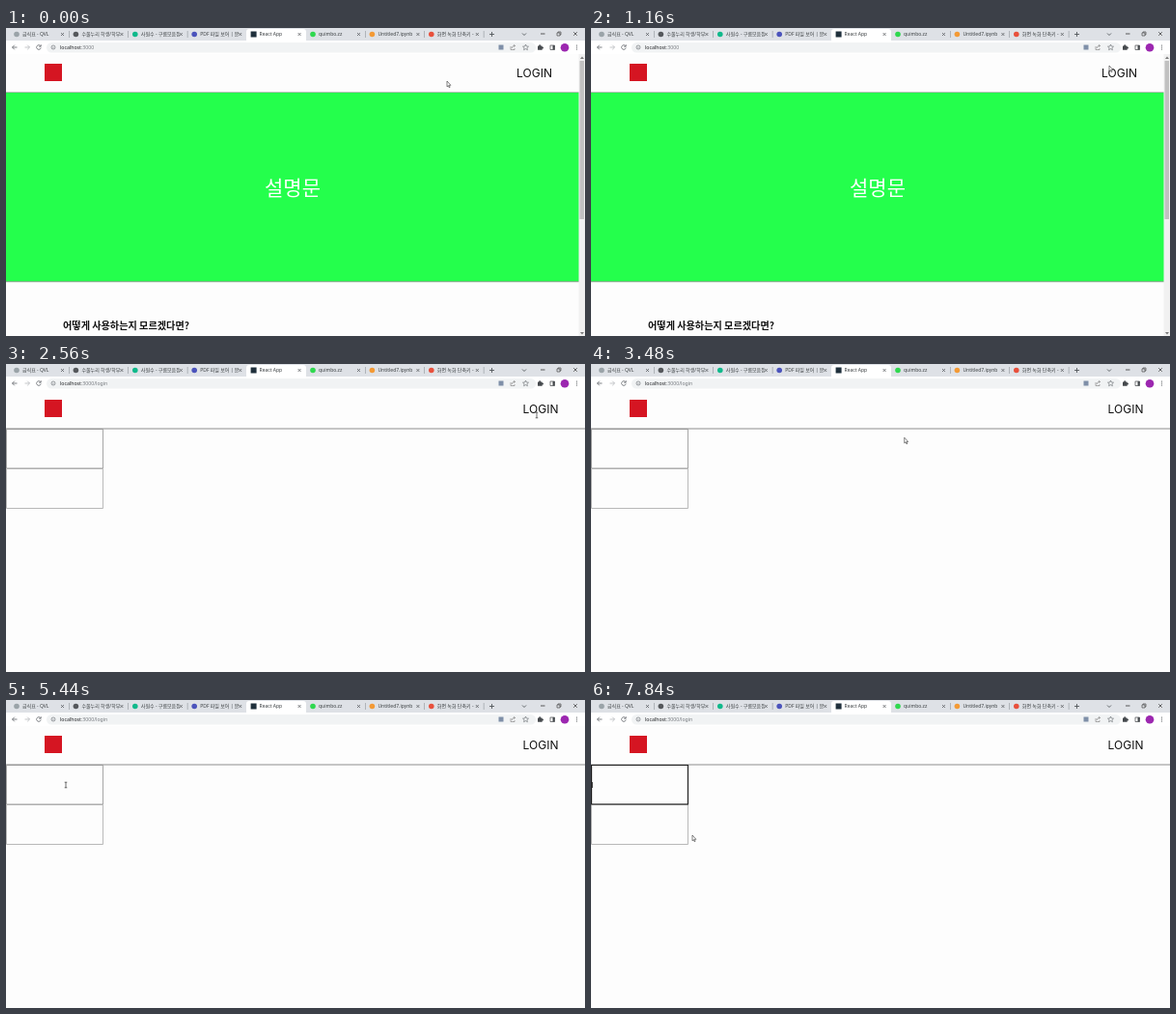
Animation of 600 by 319 pixels, one loop 8 s. Source, as an HTML page with a canvas:

```html
<!DOCTYPE html>
<html lang="ko">
<head>
<meta charset="utf-8">
<title>React App</title>
<style>
html, body { margin: 0; width: 100%; height: 100%; overflow: hidden; background: #fdfdfd; }
canvas { display: block; }
</style>
</head>
<body>
<canvas id="stage" width="600" height="319"></canvas>
<script>
const ctx = document.getElementById('stage').getContext('2d');
const LOOP = 8000, STEP = 40, LOGIN_AT = 2560, FOCUS_AT = 5460, BLINK = 530;
const UI_FONT = '"Noto Sans", "Noto Sans CJK KR", "Noto Sans CJK", sans-serif';
const KOREAN = '"Noto Sans CJK KR", "Noto Sans CJK", sans-serif';

// Pointer stops: time, x, y
const pointerPath = [
  [0, 457, 55], [80, 457, 55], [280, 462, 55], [440, 462, 55],
  [760, 500, 49], [1160, 537, 39], [1280, 537, 39], [1600, 542, 46],
  [1760, 542, 46], [2200, 549, 52], [2360, 549, 52], [2480, 550, 53],
  [2960, 550, 53], [3120, 546, 52], [3280, 546, 52], [3760, 15, 110],
  [3920, 15, 110], [4320, 520, 53], [4680, 562, 43], [4880, 562, 43],
  [4920, 562, 42], [5160, 562, 42], [5440, 62, 88], [5520, 60, 88],
  [5760, 58, 122], [5960, 57, 92], [6240, 57, 82], [6520, 57, 82],
  [7320, 105, 140], [LOOP, 105, 140]
];

const tabs = [
  ['급식표 - QVL', '#9aa3a8'],
  ['수풀누리 학생/학부모', '#55585c'],
  ['사원수 - 구름모음집', '#10b98b'],
  ['PDF 파일 보어 | 문서', '#4b53bc'],
  ['React App', '#20303c'],
  ['quimbo.zz', '#2fd84f'],
  ['Untitled7.ipynb', '#f39a35'],
  ['화면 녹화 단축키 -', '#e8503c']
];

function rect(x, y, w, h, color) {
  ctx.fillStyle = color;
  ctx.fillRect(x, y, w, h);
}

function pill(x, y, w, h, r, color) {
  ctx.fillStyle = color;
  ctx.beginPath();
  ctx.roundRect(x, y, w, h, r);
  ctx.fill();
}

function disc(x, y, r, color) {
  ctx.fillStyle = color;
  ctx.beginPath();
  ctx.arc(x, y, r, 0, Math.PI * 2);
  ctx.fill();
}

function stroke(d, color = '#5f6368', width = 0.8) {
  ctx.strokeStyle = color;
  ctx.lineWidth = width;
  ctx.stroke(new Path2D(d));
}

function fillPath(d, color) {
  ctx.fillStyle = color;
  ctx.fill(new Path2D(d));
}

function text(str, x, y, font, color, align = 'left') {
  ctx.font = font;
  ctx.fillStyle = color;
  ctx.textAlign = align;
  ctx.textBaseline = 'alphabetic';
  ctx.fillText(str, x, y);
}

function cross(x, y, r, color) {
  stroke(`M${x - r} ${y - r}l${2 * r} ${2 * r}m0 ${-2 * r}l${-2 * r} ${2 * r}`, color, 0.7);
}

function drawTabs() {
  rect(0, 0, 600, 13, '#dee1e6');
  pill(249, 1, 62, 14, 3, '#fff');
  tabs.forEach(([title, color], i) => {
    const x = 11 + i * 61.4;
    if (i === 4) pill(x - 3, 3.5, 6, 6, 0, color);
    else disc(x, 6.5, 2.8, color);
    ctx.save();
    ctx.beginPath();
    ctx.rect(x + 5, 0, 41, 13);
    ctx.clip();
    text(title, x + 6, 8.4, `5px ${UI_FONT}`, '#3c4043');
    ctx.restore();
    cross(x + 47.5, 6.5, 1.5, '#4c5054');
    if (i !== 3 && i !== 4) rect(x + 54, 3, 0.6, 7, '#90949a');
  });
  stroke('M501 6.5h5m-2.5 -2.5v5', '#45494d');
  stroke('M535 5.5l2 2l2 -2', '#45494d');
  stroke('M554 6h4.5', '#333');
  stroke('M571 5h3v3h-3zM572 5v-1h3v3h-1', '#333', 0.6);
  cross(590, 6, 1.8, '#333');
}

function drawToolbar(onLogin) {
  rect(0, 13, 600, 14, '#fff');
  pill(42, 15, 507, 10.5, 5.2, '#f1f3f4');
  stroke('M11.5 20h-5m2.3 -2.3l-2.3 2.3l2.3 2.3');
  stroke('M19.5 20h5m-2.3 -2.3l2.3 2.3l-2.3 2.3', '#b5b8bb');
  stroke('M35.7 18.5a2.3 2.3 0 1 0 .5 2M36.2 17.2v2h-2');
  stroke('M47 20a2 2 0 1 0 4 0a2 2 0 1 0 -4 0M49 19.7v1.3', '#5f6368', 0.6);

  const font = `5.2px ${UI_FONT}`;
  text('localhost', 56, 22, font, '#202124');
  text(':3000' + (onLogin ? '/login' : ''), 56 + ctx.measureText('localhost').width, 22, font, '#777b80');

  rect(510.5, 17.5, 5, 5, '#7f8fa8');
  stroke('M523 19v3.5h4v-1.5M524.3 21c0 -2 1 -2.6 3.2 -2.6m-1.4 -1.2l1.5 1.2l-1.5 1.3', '#777', 0.6);
  stroke('M538.5 17l.9 2l2.1 .2l-1.6 1.4l.5 2.1l-1.9 -1.1l-1.9 1.1l.5 -2.1l-1.6 -1.4l2.1 -.2z', '#5f6368', 0.6);
  pill(551, 18.5, 4.7, 4.3, 0.5, '#45494d');
  disc(553.2, 18.2, 1, '#45494d');
  disc(556, 20.5, 1, '#45494d');
  stroke('M564 18h4.5v4.5h-4.5z', '#45494d', 0.7);
  rect(566.5, 18, 2, 4.5, '#45494d');
  disc(579, 20.2, 4.3, '#9c27b0');
  [18, 20, 22].forEach(y => disc(591.5, y, 0.55, '#45494d'));
}

function drawHeader(onLogin) {
  rect(0, 27, 600, 292, '#fdfdfd');
  rect(40, 37, 18, 18, '#d51522');
  text('LOGIN', onLogin ? 554 : 547.5, 50.8, '12px Inter, sans-serif', '#111', 'center');
}

function drawHome() {
  rect(0, 66, 594, 1, '#b4bcb6');
  rect(0, 67, 594, 195, '#24ff4c');
  rect(0, 262, 594, 1, '#78b583');
  rect(0, 263, 594, 1, '#e4e8e5');
  text('설명문', 297, 172.5, `21px ${KOREAN}`, '#fff', 'center');
  text('어떻게 사용하는지 모르겠다면?', 59, 311.7, `bold 10.15px ${KOREAN}`, '#111');
  rect(593.5, 27, 6.5, 292, '#f1f1f1');
  rect(594.5, 34, 4.5, 164, '#c1c1c1');
  fillPath('M595 32l2 -2.5l2 2.5z', '#777');
  fillPath('M595 315l2 2.5l2 -2.5z', '#777');
}

function drawLogin(t) {
  rect(0, 66.5, 600, 1, '#8d8d8d');
  stroke('M.5 67.5h100v40.5h-100z', '#909090', 0.8);
  stroke('M.5 108.5h100v41h-100z', '#a8a8a8', 0.8);
  if (t < FOCUS_AT) return;
  stroke('M.5 67.5h100v40.5h-100z', '#222', 1.2);
  if (Math.floor((t - FOCUS_AT) / BLINK) % 2 === 0) rect(1.2, 85, 0.8, 6, '#333');
}

function pointerAt(t) {
  const i = pointerPath.findIndex(p => p[0] > t);
  const [t0, x0, y0] = pointerPath[i - 1];
  const [t1, x1, y1] = pointerPath[i];
  const k = (t - t0) / (t1 - t0);
  return [x0 + (x1 - x0) * k, y0 + (y1 - y0) * k];
}

function drawPointer(t, onLogin) {
  const [x, y] = pointerAt(t);
  const overLabel = x > (onLogin ? 535 : 529) && x < 574 && y > 40 && y < 56;
  const overInput = onLogin && x < 101 && y > 67 && y < 150;
  ctx.save();
  ctx.translate(x, y);
  if (overLabel || overInput) {
    stroke('M-1.3 -2.8h2.6M0 -2.8v5.6M-1.3 2.8h2.6', '#333', 0.7);
  } else {
    const arrow = 'M0 0v5.8l1.3 -1.2l.9 2.1l.9 -.4l-.9 -2h1.7z';
    fillPath(arrow, '#fff');
    stroke(arrow, '#333', 0.6);
  }
  ctx.restore();
}

function frame(now) {
  const t = Math.floor((now % LOOP) / STEP) * STEP;
  const onLogin = t >= LOGIN_AT;
  drawTabs();
  drawToolbar(onLogin);
  drawHeader(onLogin);
  if (onLogin) drawLogin(t);
  else drawHome();
  drawPointer(t, onLogin);
  requestAnimationFrame(frame);
}
requestAnimationFrame(frame);
</script>
</body>
</html>
```
